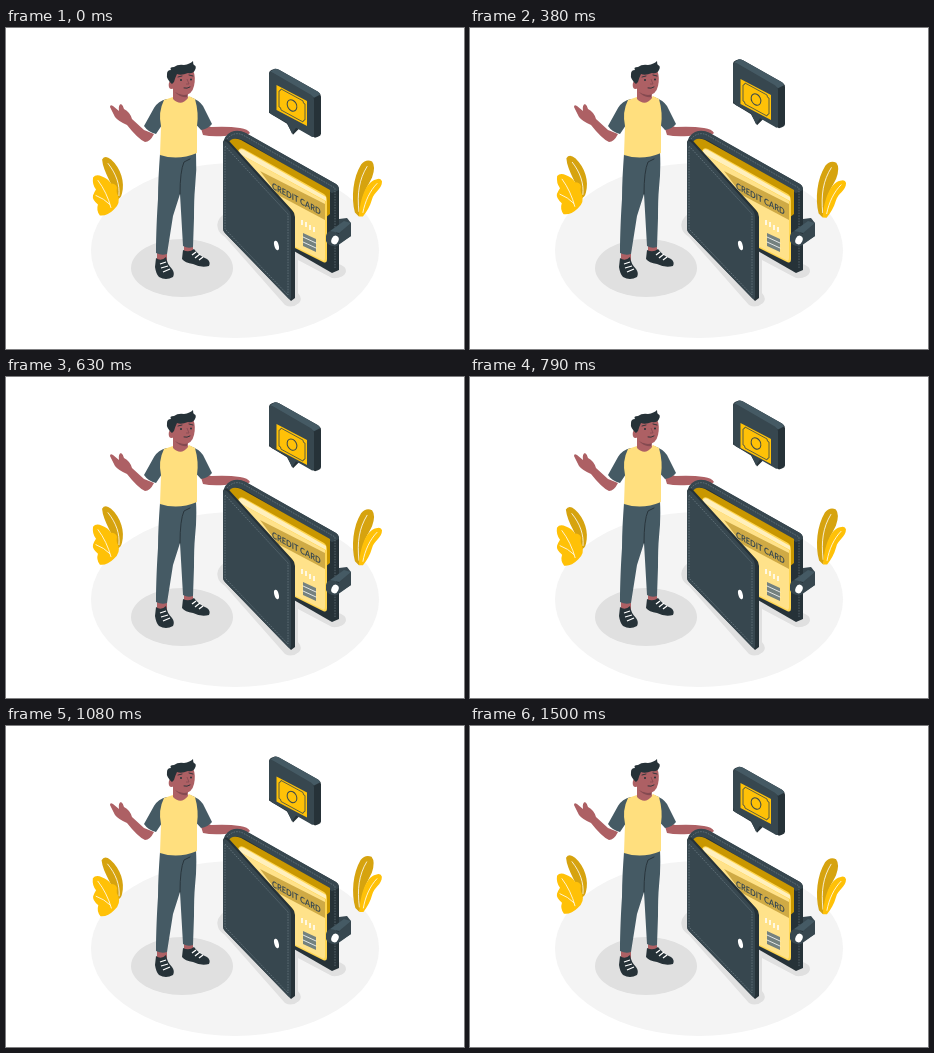
An HTML page for the animation above (1.54 s loop, 458 px wide and 321 px high).

```html
<!DOCTYPE html>
<html lang="en">
<head>
<meta charset="utf-8">
<title>Wallet</title>
<style>
  html, body { margin: 0; width: 100%; height: 100%; overflow: hidden; background: #fff; }
  svg { display: block; width: 100vw; height: 100vh; }
  .line { fill: none; stroke: #fff; stroke-width: .8; stroke-linecap: round; }
  .stitch { fill: none; stroke: #82939b; stroke-width: .5; stroke-dasharray: 1.6 1.1; }
  .ink { fill: none; stroke: #263238; stroke-width: .9; stroke-linecap: round; }
  .skin { fill: #ad6064; }
  .dark { fill: #263238; }
  .slate { fill: #37474f; }
  .cloth { fill: #455a64; }
</style>
</head>
<body>
<svg viewBox="0 0 458 321">
  <!-- floor and shadows -->
  <ellipse cx="229" cy="222.500" rx="144" ry="87.500" fill="#f4f4f4"/>
  <ellipse cx="176" cy="240" rx="51" ry="29" fill="#e0e0e0"/>
  <path d="M218 186Q209 193 212 201Q213 205 219 209L279 277Q286 281 293 275Q297 271 292 265L292 232L326 250Q337 251 340 244Q341 238 330 235Z" fill="#e0e0e0"/>

  <g id="leaves">
    <path d="M96 132Q99 127 105 132C115 141 119 155 116 166Q115 171 111 172C108 158 97 145 96 132Z" fill="#d6a30f"/>
    <path class="line" d="M102 136C110 146 114 157 113 168"/>
    <path d="M87 150Q90 146 96 149Q102 151 105 156Q110 156 111 160Q110 165 112 168Q115 176 108 182Q101 189 94 188Q90 183 92 177Q86 172 87 168Q88 165 90 162Q86 157 87 150Z" fill="#ffc107"/>
    <path class="line" d="M92 153Q101 165 105 180M90 168Q98 171 104 177"/>
    <path d="M349 184C345 169 347 149 355 136Q360 130 366 133Q370 138 366 149C362 157 358 163 357 171L353 188Z" fill="#d6a30f"/>
    <path class="line" d="M361 138C353 151 351 165 353 183"/>
    <path d="M353 188C354 171 360 153 370 151Q375 149 376 153C376 161 368 163 366 171C364 178 361 183 357 188Z" fill="#ffc107"/>
    <path class="line" d="M371 155C364 162 359 173 357 184"/>
  </g>

  <!-- person -->
  <path class="skin" d="M151 222H161V235H151ZM178 214H187V228H178Z"/>
  <path class="dark" d="M150 230Q155 234 160 229Q161 236 166 241Q169 245 167 249Q160 253 153 249Q150 246 149 239ZM177 222Q183 225 188 221Q193 228 201 231Q205 234 203 238Q195 240 187 236Q179 235 176 231Z"/>
  <path d="M154 236L160 234M155 240L162 238M157 244L164 241M186 227L190 224M189 230L194 226M193 232L197 229" stroke="#fff" stroke-width="1.300"/>
  <path class="cloth" d="M154 126L190 124Q191 142 189 160Q188 170 188 190L187 219Q182 221 177 218L174 166L167 188L161 226Q156 228 150 225C150 208 151 185 152 171C152 155 153 140 154 126Z"/>
  <path class="ink" d="M174 166Q174 143 178 134L184 131"/>
  <path class="skin" d="M139 114Q132 111 121 97Q112 93 109 89L104 79Q104 76 107 78L113 83Q112 77 115 76Q117 77 118 81Q124 84 126 91L138 102L148 106Q144 114 139 114ZM193 94L205 99Q222 98 234 100Q242 101 244 105L240 108Q229 105 219 108Q205 109 197 107Z"/>
  <path class="cloth" d="M161 71Q152 73 148 80L138 98Q142 104 150 106L160 91ZM184 69Q193 72 197 78L206 96Q202 101 195 102L186 92Z"/>
  <path d="M158 72L167 69Q176 76 183 68L189 71Q193 85 191 98L191 125Q172 133 154 127L155 98Q152 84 158 72Z" fill="#ffdf7e"/>
  <path class="skin" d="M167 57L181 60L182 70Q175 79 167 71Z"/>
  <path d="M169 64Q175 68 182 65L181 69Q174 70 169 64Z" fill="#854a51"/>
  <ellipse class="skin" cx="165.500" cy="57" rx="2.800" ry="4"/>
  <path class="skin" d="M166 44Q178 38 187 42Q190 49 188 58Q186 67 178 67Q170 66 167 59Z"/>
  <path class="dark" d="M166 56Q160 51 161 46Q161 42 165 42Q163 39 168 39Q172 36 178 37Q184 36 187 33Q187 36 188 37Q191 38 189 42Q187 46 182 45Q175 48 171 46Q169 50 168 54Z"/>
  <path class="ink" d="M172 49L176 48M183 47L187 48M178 60Q181 61 184 59"/>
  <path d="M181 51L183 56L180 56" fill="none" stroke="#854a51" stroke-width=".8"/>
  <circle class="dark" cx="175" cy="52" r="1"/><circle class="dark" cx="185" cy="51.500" r="1"/>

  <!-- wallet: back, card, strap, front cover -->
  <path class="slate" d="M333 191L341 190L345 195V208L331 217L326 203Z"/>
  <path class="dark" d="M222 109Q230 101 239 105L330 156Q333 158 333 162V242L326 245L222 185Z"/>
  <path class="slate" d="M217 117Q217 108 225 104Q232 101 240 105L330 156Q333 158 333 162L326 165L239 113Q230 108 224 113L226 127Z"/>
  <path class="stitch" d="M221 111Q228 103 237 107L329 160V240"/>
  <path d="M222 116Q225 108 235 112L324 162V186L319 190L231 127Z" fill="#c99700"/>
  <path class="dark" d="M229 122L233 125V131Z"/>
  <path d="M232 123Q233 119 238 121L318 166Q321 168 321 173V231Q321 236 317 234L287 219V184L232 129Z" fill="#ffd54f"/>
  <path d="M233 123Q234 120 238 122L320 169V173L234 126Z" fill="#fff0bd"/>
  <path d="M234 126L319 173V230Q319 234 316 232L288 218V184L234 129Z" fill="#ffe28a"/>
  <path d="M254 143L319 176V192L272 167Z" fill="#cfaa45"/>
  <text transform="matrix(.86 .47 0 1 266 160.500)" font-family="Lato, sans-serif" font-weight="700" font-size="8.700" fill="#37474f">CREDIT CARD</text>
  <path d="M296 192V197M300 194V199M304 197V202M308 199V204" stroke="#fff" stroke-width="1.500"/>
  <path d="M297 205L310 211V224L297 218Z" fill="#74817f"/>
  <path class="line" d="M297 209L310 215M297 214L310 220"/>
  <path class="slate" d="M320 208Q321 203 326 203L333 206L345 195V208L331 218Q322 219 320 213Z"/>
  <path d="M324 203L338 193L345 195L333 205Z" fill="#455a64"/>
  <ellipse cx="329" cy="212" rx="3.500" ry="4.500" fill="#fff" transform="rotate(25 329 212)"/>
  <path class="dark" d="M217 114Q220 109 224 114L286 182Q289 185 289 189V270L285 273L219 205Q217 203 217 200Z"/>
  <path class="slate" d="M217 117Q217 110 222 115L282 181Q285 184 285 188V269Q285 273 282 270L219 205Q217 203 217 200Z"/>
  <path class="stitch" d="M219 118L282 186V267L219 201Z"/>
  <ellipse cx="270.500" cy="217.500" rx="2.200" ry="4.800" fill="#fff" transform="rotate(-15 270.500 217.500)"/>

  <!-- speech bubble and its banknote -->
  <g id="bubble">
    <path class="dark" d="M263 45Q263 42 266 41L269 40Q271 40 273 41L312 63Q315 65 315 68V105Q315 107 312 108L309 109L293 100L287 106L281 95L263 84Z"/>
    <path d="M264 43L269 40Q271 40 273 41L312 63Q314 64 314 66L308 69Z" fill="#455a64"/>
    <path class="slate" d="M263 46Q263 42 267 44L305 66Q308 68 308 71V106Q308 110 304 107L290 99L286 105L281 94L266 86Q263 84 263 81Z"/>
  </g>
  <g id="note">
    <path d="M270.500 56L301 72V97L270.500 81Z" fill="#ffc107"/>
    <path d="M273 62Q275 62 275 60L297 72Q297 75 299 75V91Q297 91 297 93L275 81Q275 78 273 78Z" fill="none" stroke="#37474f" stroke-width=".8"/>
    <ellipse cx="286" cy="76.500" rx="4.500" ry="6" transform="rotate(-28 286 76.500)" fill="none" stroke="#37474f"/>
  </g>
</svg>
<script>
  const LOOP = 1540;
  const [bubble, note, leaves] = ['bubble', 'note', 'leaves'].map(id => document.getElementById(id));

  // Triangle wave: 0 at the start, 1 halfway through the loop.
  const wave = t => 1 - Math.abs(1 - 2 * (t / LOOP % 1));
  const lift = (part, y) => part.setAttribute('transform', `translate(0 ${y})`);

  function draw(now) {
    const t = now % LOOP;
    const rise = wave(t + 22);
    lift(bubble, 1.2 - 18.8 * rise);
    lift(note, 1.3 - 12 * rise);
    leaves.setAttribute('transform', `rotate(${1.9 * (wave(t + 470) - 0.5)} 231 160)`);
    requestAnimationFrame(draw);
  }
  draw(performance.now());
</script>
</body>
</html>
```
